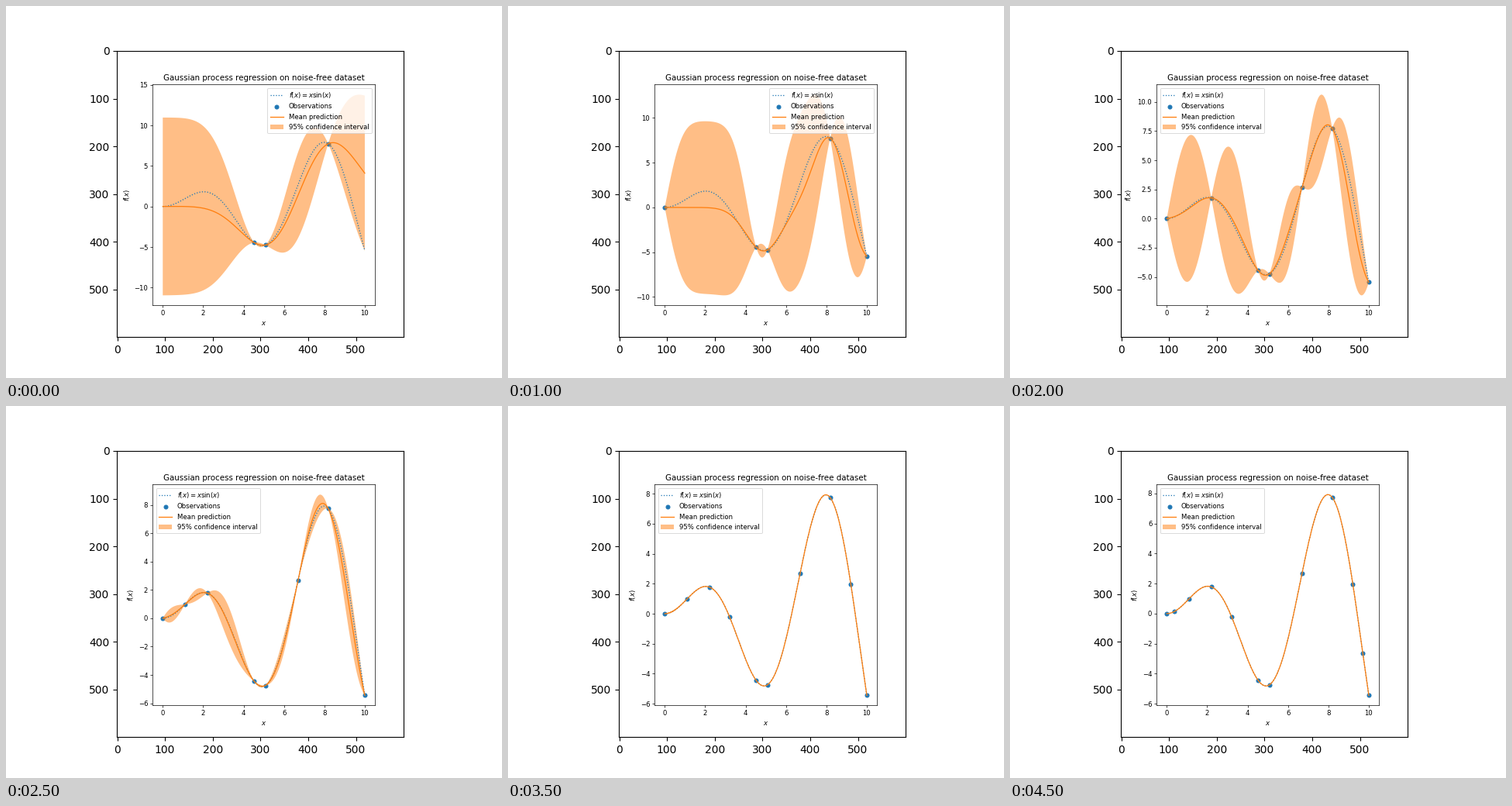
A matplotlib script that plays this animation: 640x480 px, repeating every 5000 ms.

```python
import numpy as np
import matplotlib.pyplot as plt
from matplotlib.animation import FuncAnimation

STEPS = 10
SIDE = 370              # side of the inner picture, px
SCALE = SIDE / 600      # the inner plot is a 600 px figure, shrunk

plt.rcParams.update({
    "font.family": "DejaVu Sans",
    "font.size": 10 * SCALE,
    "lines.linewidth": 1.5 * SCALE,
    "patch.linewidth": 1.0 * SCALE,
    "axes.linewidth": 0.8 * SCALE,
    "axes.labelpad": 4 * SCALE,
    "axes.titlepad": 6 * SCALE,
})
for name in ("xtick", "ytick"):
    plt.rcParams.update({
        f"{name}.major.size": 3.5 * SCALE,
        f"{name}.major.width": 0.8 * SCALE,
        f"{name}.major.pad": 3.5 * SCALE,
    })

X = np.linspace(0, 10, 1000)
Y = X * np.sin(X)


def rbf(a, b, length):
    return np.exp(-0.5 * ((a[:, None] - b[None, :]) / length) ** 2)


def factor(x, length):
    return np.linalg.cholesky(rbf(x, x, length) + 1e-12 * np.eye(len(x)))


def fit(x, y):
    """Length scale and variance with the highest marginal likelihood."""
    best = (np.inf, 1.0, 1.0)
    for length in np.geomspace(0.3, 6, 1000):
        chol = factor(x, length)
        quad = np.sum(np.linalg.solve(chol, y) ** 2)
        var = np.clip(quad / len(x), 1e-5, 1e5)
        cost = (len(x) * np.log(var) + quad / var
                + 2 * np.log(np.diag(chol)).sum())
        best = min(best, (cost, length, var))
    return best[1:]


def predict(x, y):
    length, var = fit(x, y)
    chol = factor(x, length)
    v = np.linalg.solve(chol, rbf(x, X, length))
    mean = v.T @ np.linalg.solve(chol, y)
    std = np.sqrt(var * np.clip(1 - np.sum(v ** 2, axis=0), 0, None))
    return mean, std


def learn():
    """Each step observes the point where the last model was least certain."""
    picks, stages = [507, 818, 452], []
    for _ in range(STEPS):
        x, y = X[picks], Y[picks]
        mean, std = predict(x, y)
        stages.append((x, y, mean, std))
        picks.append(int(np.argmax(std)))
    return stages


stages = learn()

fig = plt.figure(figsize=(6.4, 4.8), dpi=100, facecolor="white")


def add_axes(left, bottom, width, height):
    """Axes placed in pixels from the lower left corner."""
    return fig.add_axes([left / 640, bottom / 480, width / 640, height / 480])


outer = add_axes(143.2, 52.8, 369.6, 369.6)
outer.set(xlim=(-0.5, 599.5), ylim=(599.5, -0.5),
          xticks=range(0, 600, 100), yticks=range(0, 600, 100))
outer.tick_params(labelsize=10, length=3.5, width=0.8, pad=3.5)
for spine in outer.spines.values():
    spine.set_linewidth(0.8)

# The inner picture sits on whole pixels, its corner at (143, 53).
ax = add_axes(143 + 0.125 * SIDE, 53 + 0.11 * SIDE, 0.775 * SIDE, 0.77 * SIDE)


def draw(i):
    x, y, mean, std = stages[i]
    ax.clear()
    ax.plot(X, Y, label=r"$f(x) = x \sin(x)$", linestyle="dotted")
    ax.scatter(x, y, s=36 * SCALE ** 2, label="Observations")
    ax.plot(X, mean, label="Mean prediction")
    ax.fill_between(X, mean - 1.96 * std, mean + 1.96 * std,
                    facecolor="tab:orange", linewidth=0, alpha=0.5,
                    label="95% confidence interval")
    ax.legend(loc="upper right" if i < 4 else "upper left")
    ax.set_xlabel("$x$")
    ax.set_ylabel("$f(x)$")
    ax.set_title("Gaussian process regression on noise-free dataset")
    return ax.get_children()


anim = FuncAnimation(fig, draw, frames=STEPS, interval=500,
                     repeat=True, repeat_delay=0, blit=False)
plt.show()
```
